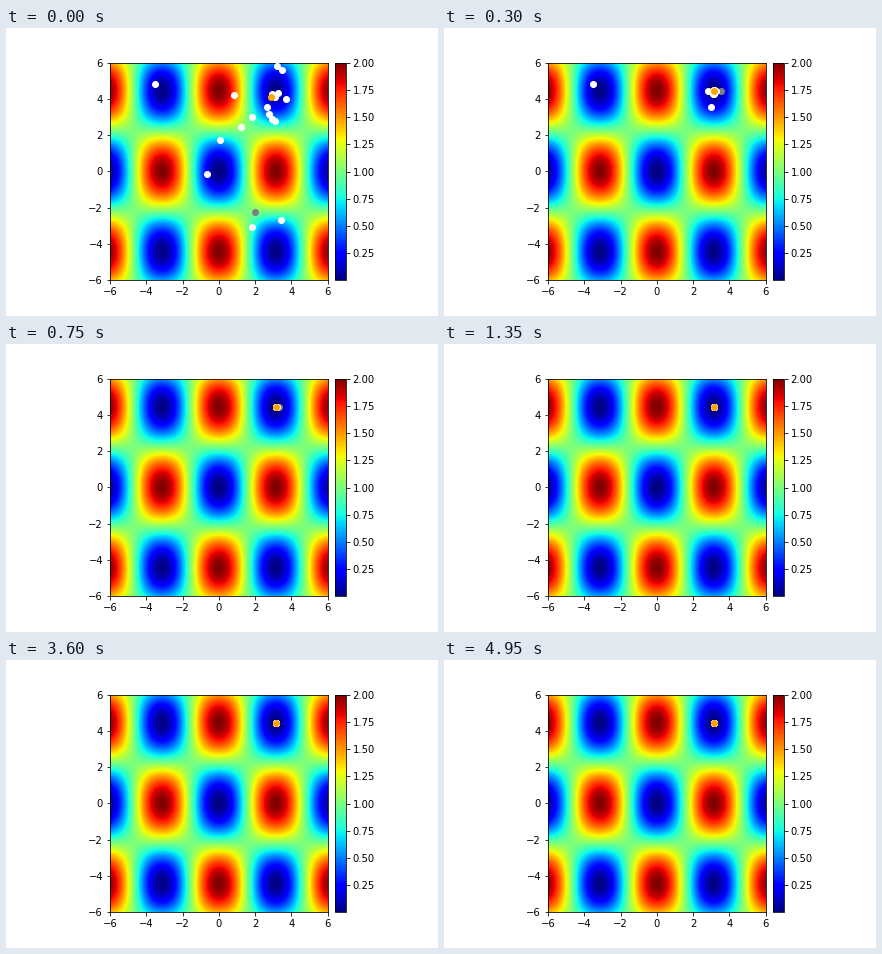
Write a matplotlib script that moves like this. It is 432x288 px and loops after 5000 ms.

```python
import numpy as np
import matplotlib.pyplot as plt
from matplotlib.animation import FuncAnimation
from mpl_toolkits.axes_grid1 import make_axes_locatable

plt.rcParams.update({"font.family": "DejaVu Sans", "font.size": 10,
                     "figure.subplot.bottom": 0.125,
                     "figure.subplot.left": 0.127})

FRAMES, STEP_MS = 100, 50
GATHERED, SETTLED = 3, 17
OPTIMUM = np.array([np.pi, np.pi * np.sqrt(2)])


def griewank(x, y):
    return 1 + (x**2 + y**2) / 4000 - np.cos(x) * np.cos(y / np.sqrt(2))


def ring(center, rx, ry, degrees):
    a = np.radians(degrees)
    return np.column_stack([center[0] + rx * np.cos(a),
                            center[1] + ry * np.sin(a)])


# Starting places: waiting outliers, a loose trail, a tall flock, a tight core.
waiting = np.array([(-3.50, 4.82), (1.86, -3.08), (3.42, -2.69)])
trail = [(-0.66, -0.15), (0.04, 1.73), (1.20, 2.45), (1.82, 2.99),
         (0.82, 4.21), (1.98, -2.25)]
flock = ring((3.15, 4.30), 0.57, 1.55, np.r_[-150:-95:4j, -12, 55, 82])
core = ring((3.12, 4.24), 0.20, 0.15, np.array([35, 170, 265]))
movers = np.vstack([trail, flock, core])
leader = np.array([2.88, 4.10])

# Places after gathering: failed trials, two slow points and a tilted oval.
failed = [(-0.30, 4.60), (2.82, 2.28), (3.24, 2.50)]
slow = OPTIMUM + [(0.43, -0.03), (0.14, 0.0)]
angles = np.linspace(50, 320, len(movers) - len(failed) - len(slow))
radius = 0.33 + 0.13 * np.cos(2 * np.radians(angles - 52))
oval = ring(OPTIMUM, radius, radius, angles)
gathered = np.vstack([failed, slow, oval])

SLOW = slice(len(failed), len(failed) + len(slow))
LEAVE = np.array([8, 6, 5])     # step at which each outlier sets off


def toward(points, left):
    return OPTIMUM + (points - OPTIMUM) * np.reshape(left, (-1, 1))


def mover_places(n):
    if n <= GATHERED:
        return movers + (gathered - movers) * n / GATHERED
    left = np.full(len(movers), 0.45 ** (n - GATHERED))
    u = min(1, (n - GATHERED) / (SETTLED - GATHERED))
    left[SLOW] = 1 - u**3
    return toward(gathered, left)


def is_gray(n):
    i = np.arange(len(movers))
    if n < 2:
        return i == len(trail) - 1
    if n < 6:
        return i <= len(failed)
    return (i == len(failed)) & (n < SETTLED)


fig, ax = plt.subplots(figsize=(6, 4), dpi=72)
grid = np.linspace(-6, 6, 400)
X, Y = np.meshgrid(grid, grid)
image = ax.imshow(griewank(X, Y), extent=(-6, 6, -6, 6), origin="lower",
                  cmap="jet", interpolation="bilinear")
cax = make_axes_locatable(ax).append_axes("right", size="5%", pad=0.1)
bar = fig.colorbar(image, cax=cax)
bar.set_ticks(np.arange(0.25, 2.01, 0.25))
ticks = range(-6, 7, 2)
ax.set(xlim=(-6, 6), ylim=(-6, 6), xticks=ticks, yticks=ticks)


def dots(color, z):
    return ax.scatter([], [], s=36, color=color, linewidths=1, zorder=z)


gray, white, orange = dots("gray", 3), dots("white", 4), dots("orange", 5)


def draw(n):
    pos, mask = mover_places(n), is_gray(n)
    left = 0.12 ** np.maximum(0.0, n - LEAVE + 1)
    gray.set_offsets(pos[mask])
    white.set_offsets(np.vstack([pos[~mask], toward(waiting, left)]))
    orange.set_offsets([leader + (OPTIMUM - leader) * min(1, n / GATHERED)])
    return gray, white, orange


anim = FuncAnimation(fig, draw, frames=FRAMES, interval=STEP_MS,
                     init_func=lambda: draw(0), repeat=True, repeat_delay=0)
plt.show()
```
